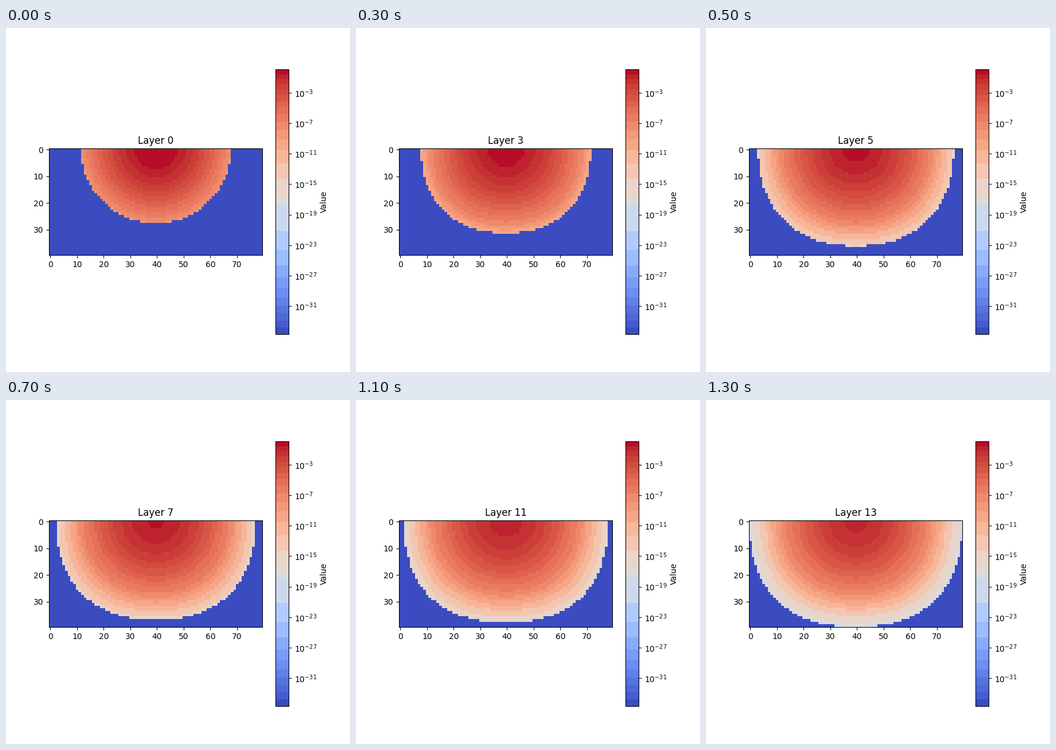
A matplotlib script for the animation above (1.4 s loop, 600 px wide and 600 px high).

```python
import numpy as np
import matplotlib.pyplot as plt
from matplotlib.animation import FuncAnimation
from matplotlib.colors import ListedColormap

ROWS, COLS, LAYERS = 40, 80, 14
LOW, HIGH = -34.67, 0.06  # exponent range of the colour scale
TONES = 462


def band_edges(count):
    """Edges over half of the scale, narrow at its end and wide in the middle."""
    return 0.488 * np.tan(np.linspace(0, 1.08, count + 1)) / np.tan(1.08)


def banded_colormap():
    base = plt.get_cmap("coolwarm")
    edges = np.concatenate([band_edges(11), 1 - band_edges(15)[::-1]])
    colors = base((edges[:-1] + edges[1:]) / 2)
    colors[0] = base(0.0)
    levels = (np.arange(TONES) + 0.5) / TONES
    return ListedColormap(colors[np.searchsorted(edges, levels) - 1])


dy, dx = np.mgrid[0:ROWS, 0:COLS] + 0.5
dx = dx - COLS / 2
r2 = dx**2 + dy**2
diagonal = np.sin(2 * np.arctan2(dy, dx)) ** 2


def field(layer):
    """Exponents of a Gaussian spot with a steeper tail and a finite reach."""
    # The front spreads, rests, then spreads again
    reach2 = np.interp(layer, [0, 3, 5.3, 10, 13],
                       [28.2, 31.8, 37.4, 37.4, 39.95]) ** 2
    bulge = 50 * np.sqrt(layer) * diagonal
    spread = 120 - 23 * np.exp(-layer / 2)
    peak = HIGH - 0.085 * layer

    rounded2 = r2 - bulge * np.minimum(r2 / reach2, 1) ** 2
    tail = 0.31 * np.maximum(np.sqrt(rounded2) - 28, 0)
    return np.where(r2 <= reach2 + bulge, peak - rounded2 / spread - tail, LOW)


fig, ax = plt.subplots(figsize=(6, 6), dpi=100)
image = ax.imshow(field(0), cmap=banded_colormap(), vmin=LOW, vmax=HIGH,
                  interpolation="nearest")
title = ax.set_title("Layer 0")
bar = fig.colorbar(image, ax=ax, label="Value")
exponents = range(-31, 0, 4)
bar.set_ticks(list(exponents),
              labels=[rf"$\mathdefault{{10^{{{e}}}}}$" for e in exponents])
bar.ax.minorticks_off()


def update(layer):
    image.set_data(field(layer))
    title.set_text(f"Layer {layer}")
    return image, title


animation = FuncAnimation(fig, update, frames=LAYERS, interval=100,
                          repeat=True, repeat_delay=0)
plt.show()
```
